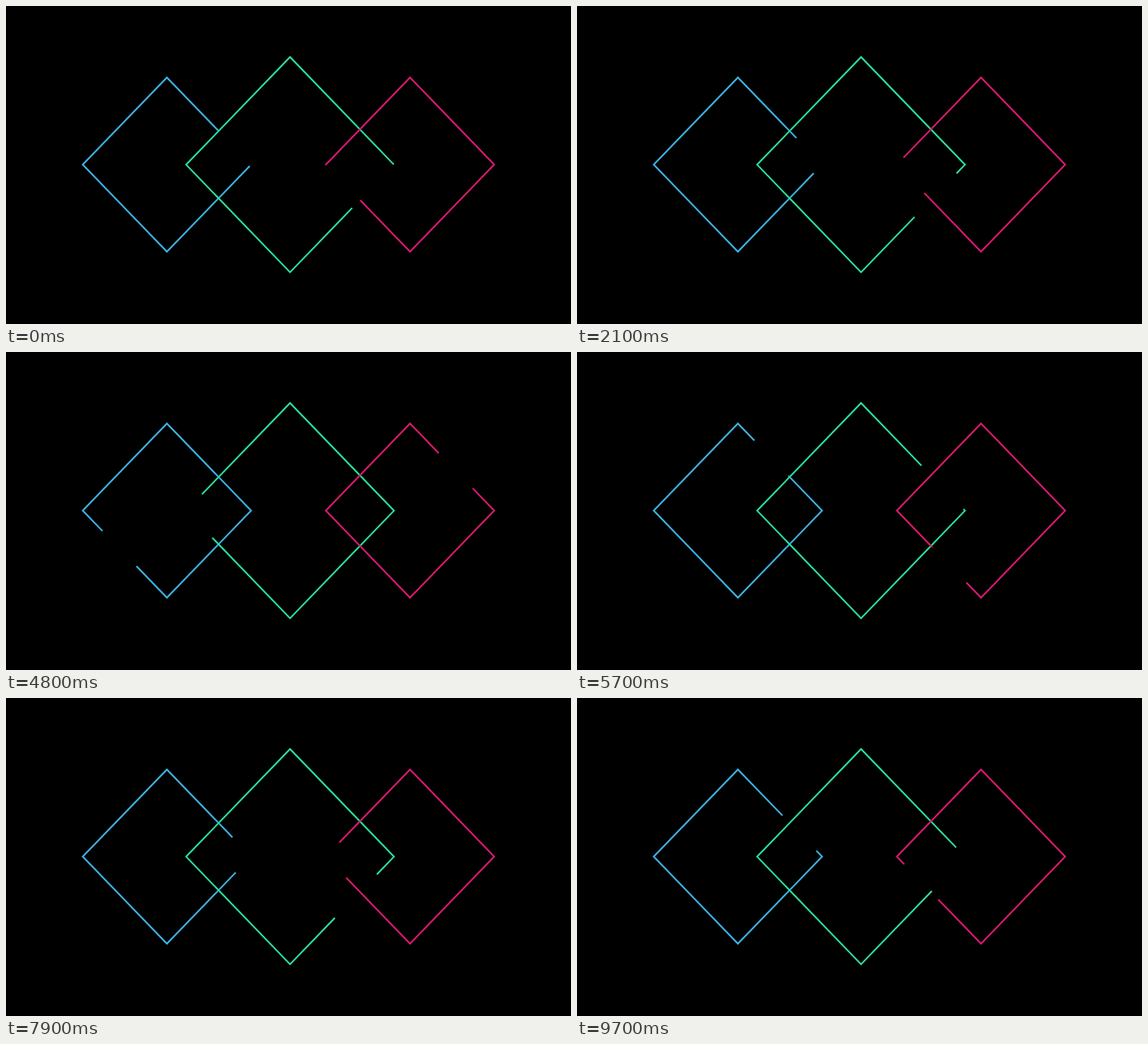
Write an HTML page that moves like this. It is 690 px wide and 388 px high and loops after 9800 ms.

```html
<!DOCTYPE html>
<html lang="en">
<head>
<meta charset="utf-8">
<title>Diamonds</title>
<style>
  html, body { margin: 0; width: 100%; height: 100%; overflow: hidden; background: #000; }
  svg { display: block; width: 100vw; height: 100vh; }
  path { fill: none; stroke-width: 2; stroke-miterlimit: 6; }
</style>
</head>
<body>
<svg id="stage" viewBox="0 0 690 388"></svg>
<script>
const LOOP = 9800, STEP = 100;
const GAP = 0.404;          // gap length, in sides
const LAP = 48;             // ticks for one trip round a diamond
const stage = document.getElementById('stage');

// start: where the gap begins, counted in sides clockwise from the top
const diamonds = [
  { x: 196.5, y: 193.5, w: 102.8, h: 106.3, start: 0.612, color: '#3fb4e4', seam: true },
  { x: 346.9, y: 193.6, w: 126.9, h: 131.3, start: 0.998, color: '#2be3a0' },
  { x: 493.4, y: 193.5, w: 102.8, h: 106.3, start: 2.591, color: '#dc1a70' }
];

function addPath(color) {
  const el = document.createElementNS('http://www.w3.org/2000/svg', 'path');
  el.setAttribute('stroke', color);
  stage.appendChild(el);
  return el;
}

// Point on the outline after u sides
function pointAt(d, u) {
  u = ((u % 4) + 4) % 4;
  const px = u < 2 ? 1 - Math.abs(u - 1) : Math.abs(u - 3) - 1;
  const py = Math.abs(u - 2) - 1;
  return (d.x + d.w * px).toFixed(2) + ' ' + (d.y - d.h * py).toFixed(2);
}

function outline(d, from, to) {
  const pts = [pointAt(d, from)];
  for (let c = Math.floor(from) + 1; c < to; c++) pts.push(pointAt(d, c));
  pts.push(pointAt(d, to));
  return 'M' + pts.join('L');
}

for (const d of diamonds) {
  d.el = addPath(d.color);
  // the outline's two ends do not quite meet
  if (d.seam) addPath('#000').setAttribute('d', outline(d, 0.608, 0.62));
}

// 25 ticks per second shown at 10 pictures per second, after a short delay
function tickAt(ms) {
  const k = Math.floor(ms / STEP);
  return k < 2 ? k : Math.floor(2.5 * k) - 3;
}

function draw(ms) {
  const turn = tickAt(ms % LOOP) / LAP * 4;
  for (const d of diamonds) {
    const gap = d.start + turn;
    d.el.setAttribute('d', outline(d, gap + GAP, gap + 4));
  }
}

let t0 = null;
function frame(now) {
  if (t0 === null) t0 = now;
  draw(Math.max(0, now - t0));
  requestAnimationFrame(frame);
}
draw(0);
requestAnimationFrame(frame);
</script>
</body>
</html>
```
